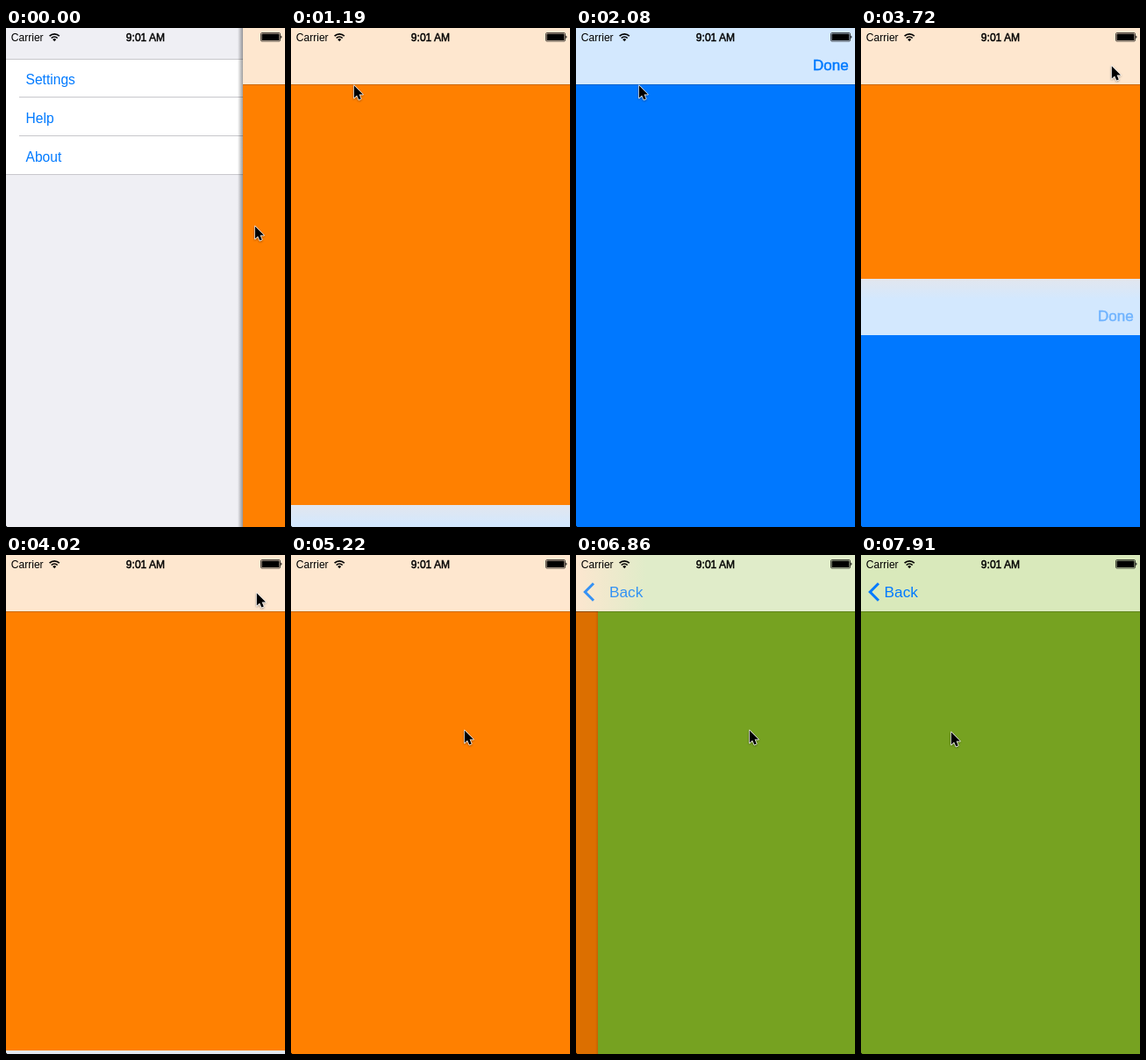
These frames come from a looping animation (318 px wide and 567 px high, 8 s). An HTML page:

```html
<!DOCTYPE html>
<html lang="en">
<head>
<meta charset="utf-8">
<title>Drawer, modal and push transitions</title>
<style>
html, body { margin: 0; width: 100%; height: 100%; overflow: hidden; background: #efeff4; }
svg { display: block; width: 318px; height: 567px; }
text { font-family: "Liberation Sans", Arial, Helvetica, sans-serif; }
.link { fill: #007aff; }
.row { font-size: 15.6px; }
.bar { font-size: 17.3px; }
.done { font-size: 17px; stroke: #007aff; stroke-width: .5; }
.status { font-size: 12.1px; }
.time { stroke: #000; stroke-width: .45; }
.rule { fill: #c8c7cc; }
.edge { fill: #000; opacity: .2; }
</style>
</head>
<body>
<svg viewBox="0 0 318 567">
  <defs>
    <linearGradient id="shade">
      <stop offset="0" stop-color="#000" stop-opacity="0"/>
      <stop offset="1" stop-color="#000" stop-opacity=".38"/>
    </linearGradient>
    <linearGradient id="haze" x1="0" y1="0" x2="0" y2="1">
      <stop offset="0" stop-color="#e2e6ee"/>
      <stop offset="1" stop-color="#d3e8fe"/>
    </linearGradient>
    <linearGradient id="blend" gradientUnits="userSpaceOnUse">
      <stop offset="0" stop-color="#fee6d0"/>
      <stop id="blendEnd" offset="1"/>
    </linearGradient>
    <filter id="soft" x="-50%" y="-50%" width="200%" height="200%">
      <feDropShadow dx="0" dy="1" stdDeviation=".8" flood-opacity=".4"/>
    </filter>
  </defs>

  <g id="drawer">
    <rect width="318" height="567" fill="#efeff4"/>
    <rect y="36" width="318" height="130" fill="#fff"/>
    <g class="rule">
      <rect y="35" width="318" height="1"/>
      <rect x="15" y="78" width="303" height="1"/>
      <rect x="15" y="122" width="303" height="1"/>
      <rect y="166" width="318" height="1"/>
    </g>
    <g class="link row">
      <text x="22.5" y="64">Settings</text>
      <text x="22.5" y="108">Help</text>
      <text x="22.5" y="152">About</text>
    </g>
  </g>

  <g id="home">
    <rect x="-6" width="6" height="567" fill="url(#shade)"/>
    <rect width="318" height="567" fill="#ff8000"/>
    <rect width="318" height="64" fill="#fee7cf"/>
    <rect class="edge" y="64" width="318" height="1"/>
  </g>

  <g id="push">
    <rect id="dim" y="64" width="318" height="503"/>
    <g id="detail">
      <rect x="-3" y="64" width="3" height="503" fill="url(#shade)" opacity=".3"/>
      <rect y="64" width="318" height="503" fill="#76a221"/>
    </g>
    <rect id="pushBar" width="318" height="64"/>
    <rect class="edge" y="64" width="318" height="1"/>
    <g id="backItem">
      <path d="M20 32.3L10.3 42L20 51.7" fill="none" stroke="#007aff" stroke-width="3"/>
      <text id="back" class="link bar" y="48">Back</text>
    </g>
  </g>

  <g id="modal">
    <rect width="318" height="567" fill="#0078ff"/>
    <rect width="318" height="64" fill="#d3e8fe"/>
    <rect id="hazeBar" width="318" height="23" fill="url(#haze)"/>
    <rect id="modalEdge" class="edge" y="64" width="318" height="1"/>
    <text id="done" class="link done" x="270" y="48">Done</text>
  </g>

  <g id="statusBar">
    <text class="status" x="5.7" y="14.7">Carrier</text>
    <text class="status time" x="136.8" y="14.7">9:01 AM</text>
    <g fill="none" stroke="#000" stroke-width="1.7">
      <path d="M49.6 9.1A8 8 0 0 1 60.8 9.1"/>
      <path d="M51.7 11.5A5 5 0 0 1 58.7 11.5"/>
    </g>
    <path d="M53.2 13A2.8 2.8 0 0 1 57.2 13L55.2 15.2Z"/>
    <rect x="290.5" y="5.5" width="22" height="9.5" rx="1.2" fill="none" stroke="#000" stroke-width=".7"/>
    <rect x="291.5" y="6.5" width="20" height="7.5" rx=".5"/>
    <path d="M313.3 8.5Q315.6 10.2 313.3 12Z"/>
  </g>
  <path d="M0 565.5V567H1.5Z"/>

  <g id="cursor">
    <path d="M.8 1.2V15.6L4.1 12.5L6.3 17.6L8.8 16.5L6.6 11.6H11Z"
      stroke="#fff" stroke-width="1.3" paint-order="stroke" stroke-linejoin="round" filter="url(#soft)"/>
  </g>
</svg>
<script>
const LOOP = 8000, W = 318, H = 567;
const el = id => document.getElementById(id);
const move = (id, x, y) => el(id).setAttribute("transform", `translate(${x} ${y})`);
const show = (id, on) => el(id).setAttribute("display", on ? "inline" : "none");
const set = (id, attrs) => {
  for (const k in attrs) el(id).setAttribute(k, attrs[k]);
};

// Time, x, y: each position holds until the next.
const path = [
  [0, 283, 224],
  [450, 262, 202], [600, 150, 112], [750, 86, 71], [900, 71, 64],
  [2380, 84, 76], [2530, 128, 85], [2680, 190, 82], [2830, 242, 66], [2980, 274, 49], [3130, 285, 42],
  [4770, 257, 74], [4920, 205, 150], [5070, 182, 190], [5220, 197, 198],
  [7610, 172, 191], [7760, 124, 197], [7910, 102, 200]
];

const stepAt = (t, start, last, gap = 150) => Math.min(last, Math.floor((t - start) / gap + .01));

// Remaining distance of a critically damped spring, settled on its last step.
function rest(step, last, phase) {
  const u = phase + 2.7 * step;
  return step >= last ? 0 : (1 + u) * Math.exp(-u);
}

function mix(a, b, k) {
  return `rgb(${a.map((v, i) => Math.round(v + (b[i] - v) * k))})`;
}

function drawModal(t) {
  const leaving = t >= 3720;
  const left = leaving
    ? 1 - rest(stepAt(t, 3720, 3), 3, 1.684)
    : rest(stepAt(t, 1190, 4), 4, .33);
  const top = Math.round(H * left);
  show("modal", t >= 1190 && top < H);
  move("modal", 0, top);
  set("hazeBar", { opacity: Math.min(1, top / 20) });
  show("modalEdge", !leaving);
  set("done", { opacity: leaving ? .47 : 1 });
}

function drawPush(t) {
  show("push", t >= 6570);
  if (t < 6570) return;
  const step = stepAt(t, 6570, 3, 146.6);
  const left = rest(step, 3, 1.474);
  const p = 1 - left, x = Math.round(W * left);
  move("detail", x, 0);
  set("dim", { opacity: .147 * p });
  set("blend", { x1: x - 30, x2: x + 55 });
  set("blendEnd", { "stop-color": mix([230, 238, 215], [217, 233, 187], Math.min(1, step / 2)) });
  set("pushBar", { fill: step === 3 ? "#d9e9bb" : "url(#blend)" });
  set("backItem", { opacity: p ** 3 });
  set("back", { x: 26.5 + 143 * left });
}

function draw(t) {
  const [, x, y] = path.findLast(p => p[0] <= t);
  move("cursor", x, y);
  move("home", t < 1190 ? 270 : 0, 0);
  drawModal(t);
  drawPush(t);
}

const start = performance.now();
function tick() {
  draw((performance.now() - start) % LOOP);
  requestAnimationFrame(tick);
}
tick();
</script>
</body>
</html>
```
